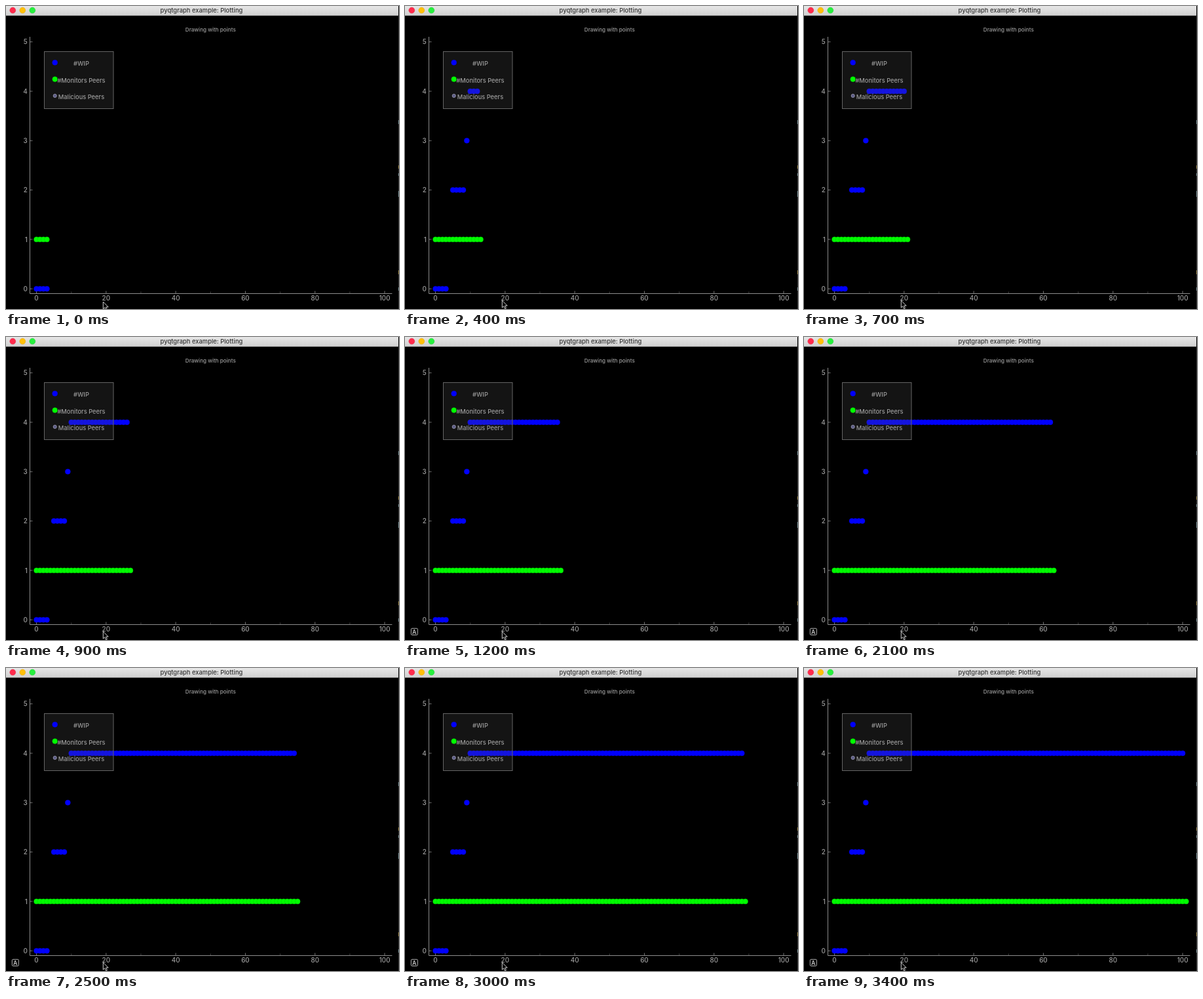
An HTML page that plays this animation: 600 by 462 pixels, repeating every 3.5 s.

```html
<!DOCTYPE html>
<html lang="en">
<head>
<meta charset="utf-8">
<title>Plotting</title>
<style>
  html, body { margin: 0; width: 100%; height: 100%; overflow: hidden; background: #000; }
  svg { display: block; width: 600px; height: 462px; }
  text { font-family: Inter, Roboto, sans-serif; font-weight: 500; fill: #9c9c9c; text-anchor: middle; }
  .tick { font-size: 9.9px; }
  .left { text-anchor: end; }
  .legend { font-size: 9.3px; }
  .axis { stroke: #8c8c8c; fill: none; }
  .major { stroke: #747474; }
  .minor { stroke: #404040; }
  .blue { fill: #00f; stroke: #0000e6; stroke-width: .4; }
  .green { fill: #0f0; stroke: #00d000; stroke-width: .6; }
  #auto { animation: appear 3500ms step-end infinite; }
  #cursor { animation: nudge 3500ms step-end infinite; }
  @keyframes appear { 0% { opacity: 0; } 28.57% { opacity: 1; } }
  @keyframes nudge { 0% { transform: translateY(2px); } 8.57% { transform: none; } }
</style>
</head>
<body>
<svg viewBox="0 0 600 462">
  <defs>
    <linearGradient id="bar" x2="0" y2="1">
      <stop stop-color="#e6e6e6"/><stop offset="1" stop-color="#d0d0d0"/>
    </linearGradient>
  </defs>
  <rect width="600" height="462"/>

  <!-- window edge -->
  <path d="M599.5 15V462" stroke="#303030"/>
  <path d="M599.5 174v6M599.5 255v4M599.5 282v9M599.5 429v5" stroke="#7f959c"/>
  <path d="M599.5 243v5M599.5 403v6" stroke="#a08a50"/>
  <rect width="599" height="14.7" fill="url(#bar)"/>
  <g stroke-width=".5">
    <circle cx="10.3" cy="6.6" r="4.5" fill="#ff2b4c" stroke="#e02844"/>
    <circle cx="25.3" cy="6.6" r="4.5" fill="#ffc00a" stroke="#e0a512"/>
    <circle cx="40.3" cy="6.6" r="4.5" fill="#27f03e" stroke="#20cc36"/>
  </g>
  <text x="298.5" y="10.4" style="font-size:9.4px;fill:#333">pyqtgraph example: Plotting</text>
  <text x="312.3" y="38.8" style="font-size:8.15px">Drawing with points</text>

  <g id="axes"><path class="axis" d="M36.5 47V438.5H589.5"/></g>
  <g id="dots"></g>

  <!-- legend -->
  <rect x="58.5" y="69.5" width="105.5" height="87" fill="#646464" fill-opacity=".2" stroke="#646464"/>
  <circle class="blue" cx="74.7" cy="86.2" r="4"/>
  <circle class="green" cx="74.7" cy="111.6" r="3.9"/>
  <circle cx="74.7" cy="136.9" r="2.6" fill="#5c5c88" stroke="#a0a0b0" stroke-width=".8"/>
  <g class="legend">
    <text x="115" y="91.2">#WIP</text>
    <text x="115" y="116.6">#Monitors Peers</text>
    <text x="115" y="142">Malicious Peers</text>
  </g>

  <g id="auto">
    <rect x="9.3" y="444.3" width="10" height="10" rx="1.5" fill="#000" stroke="#b4b4b4"/>
    <text x="14.3" y="452.5" style="font-size:9px;fill:#dcdcdc">A</text>
  </g>
  <path id="cursor" d="M148.3 449V460L150.8 457.7L152.6 461.6L154.4 460.8L152.7 457H156.2Z"
        fill="#000" stroke="#e8e8e8" stroke-width=".9"/>
</svg>
<script>
  const LOOP = 3500, STEP = 100, LAST = 101;
  const px = x => 46.5 + x * 5.316;
  const py = y => 431.2 - y * 75.3;

  function add(parent, tag, attrs, label) {
    const el = document.createElementNS('http://www.w3.org/2000/svg', tag);
    for (const key in attrs) el.setAttribute(key, attrs[key]);
    if (label !== undefined) el.textContent = label;
    document.getElementById(parent).append(el);
    return el;
  }

  for (let y = 0; y <= 5; y++) {
    add('axes', 'path', { class: 'major', d: `M37 ${py(y)}h3.5` });
    add('axes', 'text', { class: 'tick left', x: 32.8, y: py(y) + 3.6 }, y);
  }
  for (let x = 0; x <= 100; x += 10) {
    const major = x % 20 === 0;
    add('axes', 'path', {
      class: major ? 'major' : 'minor',
      d: `M${px(x)} 438v${major ? -3.5 : -2.5}`
    });
    if (major) add('axes', 'text', { class: 'tick', x: px(x), y: 448.6 }, x);
  }

  // Blue has a gap at 4 and trails green by one sample after it.
  const level = x => x < 4 ? 0 : x < 9 ? 2 : x < 10 ? 3 : 4;
  const dots = [];
  const dot = (cls, x, y, r, from) =>
    dots.push({ from, el: add('dots', 'circle', { class: cls, cx: px(x), cy: py(y), r }) });

  for (let x = 0; x < LAST; x++)
    if (x !== 4) dot('blue', x, level(x), 4, x < 4 ? x : x + 1);
  for (let x = 0; x <= LAST; x++) dot('green', x, 1, 3.9, x);

  // Newest sample at each step, between [step, sample] knots.
  const knots = [[0, 3], [7, 21], [25, 75], [30, 89], [34, 101]];
  function newest(step) {
    const i = knots.findIndex(k => k[0] >= step);
    if (i < 1) return knots[0][1];
    const [s0, v0] = knots[i - 1], [s1, v1] = knots[i];
    return Math.round(v0 + (v1 - v0) * (step - s0) / (s1 - s0));
  }

  let start;
  function draw(now) {
    start ??= document.timeline.currentTime ?? now;
    const time = Math.max(0, now - start) % LOOP;
    const end = newest(Math.floor(time / STEP));
    for (const d of dots) d.el.style.display = d.from <= end ? '' : 'none';
    requestAnimationFrame(draw);
  }
  requestAnimationFrame(draw);
</script>
</body>
</html>
```
